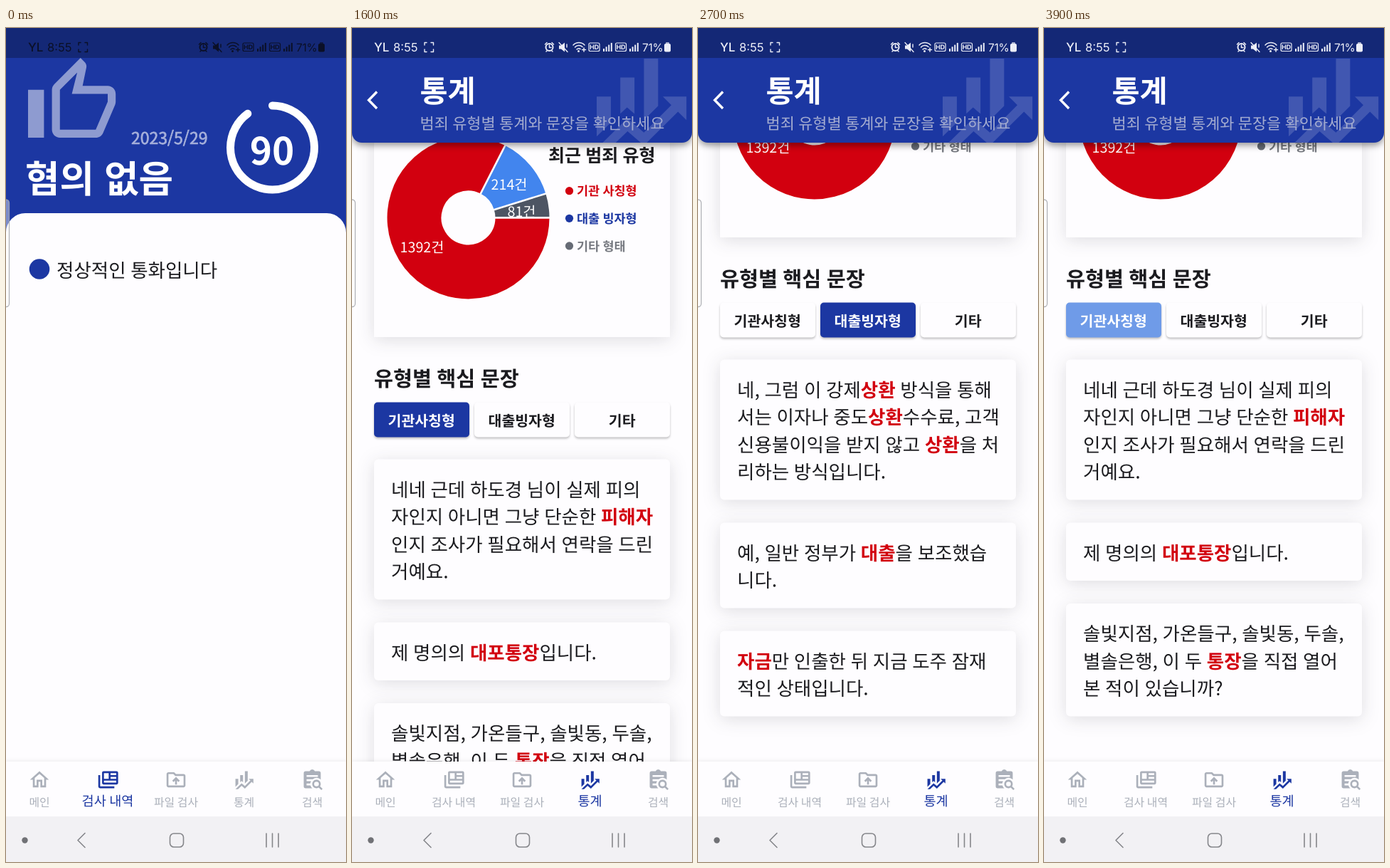
Animation of 478 by 1171 pixels, one loop 4000 ms. Source, as an HTML page:

```html
<!DOCTYPE html>
<html lang="ko">
<head>
<meta charset="utf-8">
<title>통계</title>
<style>
html, body { margin: 0; width: 100%; height: 100%; overflow: hidden; background: #fefdff; }
svg { display: block; width: 478px; height: 1171px; word-spacing: -.045em; text-rendering: geometricPrecision; font-family: "Noto Sans CJK KR", "Noto Sans CJK JP", "Noto Sans CJK", sans-serif; }
.status text { font-family: Inter, Roboto, sans-serif; }
.card { fill: #fefdff; filter: drop-shadow(0 4px 12px rgba(30, 30, 45, .14)); }
.chip { filter: drop-shadow(0 2px 1.5px rgba(0, 0, 0, .25)); }
.head { filter: drop-shadow(0 4px 5px rgba(0, 0, 0, .4)); }
.nav { filter: drop-shadow(0 -2px 2px rgba(0, 0, 0, .05)); }
.line { fill: none; stroke: currentColor; stroke-linecap: round; stroke-linejoin: round; }
</style>
</head>
<body>
<svg id="stage" viewBox="0 0 478 1171" xmlns="http://www.w3.org/2000/svg"></svg>
<script>
const BLUE = '#1c37a2', RED = '#d2000f', PAPER = '#fefdff', INK = '#1b1b1f';
const LOOP = 4000, STEP = 100, MAX_SCROLL = 235.5;

const FINANCE = 'M6 16.5L3 19.44V11H6M11 14.66L9.43 13.32L8 14.64V7H11M16 13L13 16V3H16M18.81 12.81L17 11H22V16L20.21 14.21L13 21.36L9.53 18.34L5.75 22H3L9.47 15.66L13 18.64';
const THUMB = 'M9 21h9c.83 0 1.54-.5 1.84-1.22l3.02-7.05c.09-.23.14-.47.14-.73v-2c0-1.1-.9-2-2-2h-6.31l.95-4.57.03-.32c0-.41-.17-.79-.44-1.06L14.17 1 7.58 7.59C7.22 7.95 7 8.45 7 9v10c0 1.1.9 2 2 2zM9 9l4.34-4.34L12 10h9v2l-3 7H9V9zM1 9h4v12H1z';

const NAV = [
  ['메인', 47, 'M12 5.69l5 4.5V18h-2v-6H9v6H7v-7.81l5-4.5M12 3L2 12h3v8h6v-6h2v6h6v-8h3L12 3z'],
  ['검사 내역', 143, 'M4 7V19H19V21H4C2 21 2 19 2 19V7H4M21.3 3H7.7C6.76 3 6 3.7 6 4.55V15.45C6 16.31 6.76 17 7.7 17H21.3C22.24 17 23 16.31 23 15.45V4.55C23 3.7 22.24 3 21.3 3M8 5H13V11H8V5M21 15H8V13H21V15M21 11H15V9H21V11M21 7H15V5H21V7Z'],
  ['파일 검사', 239, 'M20 6h-8l-2-2H4c-1.1 0-2 .9-2 2v12c0 1.1.9 2 2 2h16c1.1 0 2-.9 2-2V8c0-1.1-.9-2-2-2zm0 12H4V6h5.17l2 2H20v10zM9.41 14.42L11 12.84V17h2v-4.16l1.59 1.59L16 13.01 12.01 9 8 13.01z'],
  ['통계', 334.5, FINANCE],
  ['검색', 430.5, 'M19 3h-4.2a3 3 0 0 0-5.6 0H5a2 2 0 0 0-2 2v14a2 2 0 0 0 2 2h7.1a6 6 0 0 1-2-3H6v-2h3.9a6 6 0 0 1 .9-2.6H6v-2h6.6A6 6 0 0 1 21 11.8V5a2 2 0 0 0-2-2zM6 7h12v2H6zM20.3 18.9a4.5 4.5 0 1 0-1.4 1.4l2.7 2.7 1.4-1.4zM16.5 19a2.5 2.5 0 1 1 0-5a2.5 2.5 0 0 1 0 5z']
];

const CHIPS = [['기관사칭형', 31], ['대출빙자형', 172], ['기타', 313]];
const TAPS = [[0, 0], [2500, 1], [3150, 2], [3800, 0]];
const SENTENCES = [
  [['네네 근데 하도경 님이 실제 피의', '자인지 아니면 그냥 단순한 *피해자*', '인지 조사가 필요해서 연락을 드린', '거예요.'],
   ['제 명의의 *대포통장*입니다.'],
   ['솔빛지점, 가온들구, 솔빛동, 두솔,', '별솔은행, 이 두 *통장*을 직접 열어', '본 적이 있습니까?']],
  [['네, 그럼 이 강제*상환* 방식을 통해', '서는 이자나 중도*상환*수수료, 고객', '신용불이익을 받지 않고 *상환*을 처', '리하는 방식입니다.'],
   ['예, 일반 정부가 *대출*을 보조했습', '니다.'],
   ['*자금*만 인출한 뒤 지금 도주 잠재', '적인 상태입니다.']],
  [['지정한 *계좌* 외 다른 *계좌* 사례가', '확인될 경우 즉시 동결 및 국고 환', '급 조치됩니다.'],
   ['아시다시피 요즘 젊고 어린 장기', '중 신장과 각막을 3개 적출해도 우', '리가 받은 *원금*은 5000만원입니', '다.'],
   ['조사 결과, 가람도 여울시 솔마동', '지점이 2016년 4월 22일에 귀하', '의 *명의*로 오픈한 것으로 확인되었', '습니다.']]
];

// cy is the visual middle of the glyphs
const text = (x, cy, size, fill, str, attrs = '') =>
  `<text x="${x}" y="${cy + size * .375}" font-size="${size}" fill="${fill}" ${attrs}>${
    str.replace(/\*(.+?)\*/g, `<tspan fill="${RED}" font-weight="700">$1</tspan>`)}</text>`;
const BOLD = 'font-weight="700" ', MID = 'text-anchor="middle" ';
const rect = (x, y, w, h, attrs = '') => `<rect x="${x}" y="${y}" width="${w}" height="${h}" ${attrs}/>`;
const line = (d, width, attrs = '') => `<path class="line" d="${d}" stroke-width="${width}" ${attrs}/>`;
const polar = (cx, cy, r, deg) => {
  const a = deg * Math.PI / 180;
  return `${(cx + r * Math.cos(a)).toFixed(2)} ${(cy + r * Math.sin(a)).toFixed(2)}`;
};
const arc = (cx, cy, r, from, to) =>
  `M${polar(cx, cy, r, from)}A${r} ${r} 0 ${to - from > 180 ? 1 : 0} 1 ${polar(cx, cy, r, to)}`;

function resultPage() {
  return rect(0, 0, 478, 1030, `fill="${BLUE}"`) +
    `<path d="${THUMB}" transform="translate(25.4 36.4) scale(5.6)" fill="#fff" opacity=".5"/>` +
    text(176, 154.5, 23, '#a7b1db', '2023/5/29', 'stroke="#a7b1db" stroke-width=".7"') +
    text(27, 211, 52.7, '#fff', '혐의 없음', BOLD) +
    line(arc(374.5, 168, 59, -90, 234), 11, 'style="color:#fff"') +
    text(374, 172.5, 53, '#fff', '90', BOLD + MID) +
    `<path d="M0 1030V287a27 27 0 0 1 27-27H451a27 27 0 0 1 27 27V1030z" fill="${PAPER}"/>` +
    `<circle cx="47" cy="338.5" r="14.3" fill="${BLUE}"/>` +
    text(71, 340, 26.5, INK, '정상적인 통화입니다');
}

function pie(cx, cy) {
  const parts = [[1392, RED, -65, 41], [214, '#4285ee', 57.5, -47], [81, '#4d5563', 75, -9]];
  const total = parts.reduce((sum, p) => sum + p[0], 0);
  let from = 0, slices = '', spokes = '', labels = '';
  for (const [n, color, dx, dy] of parts) {
    const to = from + n / total * 360;
    slices += `<path d="${arc(cx, cy, 76, from, to)}" fill="none" stroke="${color}" stroke-width="76"/>`;
    spokes += `<path d="M${polar(cx, cy, 36, to)}L${polar(cx, cy, 116, to)}" stroke="${PAPER}" stroke-width="2.6"/>`;
    labels += text(cx + dx, cy + dy, 19.7, '#fff', n + '건', MID);
    from = to;
  }
  return slices + spokes + labels;
}

function statsBody() {
  const legend = [['기관 사칭형', RED, RED], ['대출 빙자형', BLUE, BLUE], ['기타 형태', '#666b75', '#777a81']];
  return rect(31, -31.5, 416, 325.5, 'class="card"') + pie(163.5, 126.5) +
    text(276, 38.5, 25, INK, '최근 범죄 유형', BOLD) +
    legend.map(([s, dot, ink], i) => `<circle cx="305.5" cy="${88.8 + i * 38.6}" r="5.6" fill="${dot}"/>` +
      text(316, 89 + i * 38.6, 17.5, ink, s, BOLD)).join('') +
    '<path id="spin" fill="none" stroke="#4285ee" stroke-width="5.4"/>' +
    `<g id="list">${text(31, 352, 29.3, INK, '유형별 핵심 문장', BOLD)}${
      CHIPS.map(([s, x], i) => rect(x, 385.5, 134, 49, `id="chip${i}" class="chip" rx="5"`) +
        text(x + 66.7, 411, 20.5, INK, s, `id="chipText${i}" ${BOLD} ${MID}`)).join('')}${
      SENTENCES.map((set, i) => `<g id="set${i}">${cards(set)}</g>`).join('')}</g>`;
}

function cards(set) {
  let y = 465.5, out = '';
  for (const rows of set) {
    const h = rows.length * 38.5 + 43;
    out += rect(31, y, 416, h, 'class="card" rx="6"');
    rows.forEach((s, i) => out += text(55, y + 42.5 + i * 38.5, 26.5, INK, s));
    y += h + 32;
  }
  return out;
}

function statsHeader() {
  const shape = 'M0 0H478V147a14 14 0 0 1-14 14H14a14 14 0 0 1-14-14z';
  return `<clipPath id="headClip"><path d="${shape}"/></clipPath><path class="head" d="${shape}" fill="${BLUE}"/>` +
    `<g clip-path="url(#headClip)"><path d="${FINANCE}" transform="translate(324.1 23.1) scale(6.64)" fill="#fff" opacity=".16"/></g>` +
    '<path d="M35 89.5L23.5 101.3L35 113" fill="none" stroke="#fff" stroke-width="3.4"/>' +
    text(95.5, 88, 42.5, '#fff', '통계', BOLD) +
    text(95.5, 134, 21.9, '#a4acd0', '범죄 유형별 통계와 문장을 확인하세요');
}

function statusBar() {
  const hd = x => rect(x, 21, 15, 11.5, 'rx="2" class="line" stroke-width="1.2"') +
    `<text x="${x + 7.5}" y="30.4" font-size="9" ${BOLD} ${MID}>HD</text>`;
  const bars = x => [0, 1, 2, 3].map(i => rect(x + i * 3.6, 29 - i * 2.7, 2, 4 + i * 2.7)).join('');
  return rect(0, 0, 478, 42, 'opacity=".27"') +
    `<g id="status" class="status" fill="currentColor">
    <text x="31" y="33" font-size="17" font-weight="500">YL</text><text x="58" y="33" font-size="16.5">8:55</text>` +
    line('M102 24V20.5H105M111 20.5H114.5V24M114.5 30V33.5H111M105 33.5H102V30', 1.4) +
    `<g id="shot">${rect(105.5, 24.5, 5.5, 5, 'rx="1" class="line" stroke-width="1.3"')}</g>` +
    '<circle class="line" cx="277.5" cy="27" r="5" stroke-width="2"/>' +
    line('M277.5 24V27.5H280M271.5 23L274 20.5M281 20.5L283.5 23M273 33L274 32M282 33L281 32', 1.5) +
    '<path d="M291 24.5H294L299 20.5V33.5L294 29.5H291z"/>' + line('M291 20.5L303 33.5M302 23V27', 1.4) +
    line('M311 24A11 11 0 0 1 327 24M313.5 27A7.5 7.5 0 0 1 324 26.5M316 30A4 4 0 0 1 321 29.5M326 28V33M323.5 30.5H328.5', 1.5) +
    '<circle cx="318.5" cy="32.5" r="1.5"/>' + hd(333) + bars(353) + hd(370.5) + bars(390) +
    '<text x="408" y="32.5" font-size="15.5" letter-spacing="-.3">71%</text>' +
    rect(439, 22, 9, 11.5, 'rx="2"') + rect(441, 20, 5, 3, 'rx="1" opacity=".7"') + '</g>';
}

function bottomBars() {
  return rect(0, 1030, 478, 78, `class="nav" fill="${PAPER}"`) +
    NAV.map(([s, x, d], i) => `<g id="nav${i}"><path d="${d}" fill-rule="${i === 1 ? 'evenodd' : 'nonzero'}" transform="translate(${x - 15.9} 1039.6) scale(1.327)"/>` +
      `<text id="label${i}" x="${x}" ${MID}>${s}</text></g>`).join('') +
    rect(0, 1107, 478, 64, 'fill="#f2f1f4"') +
    '<g style="color:#85868a"><circle cx="26.5" cy="1140.5" r="4.2" fill="#707175"/>' +
    line('M111 1130.5L101 1140.5L111 1150.5', 1.6) + rect(230.5, 1131, 19, 19, 'rx="5.5" class="line" stroke-width="1.6"') +
    line('M366 1131V1150M374.5 1131V1150M383 1131V1150', 1.6) + '</g>';
}

document.getElementById('stage').innerHTML =
  `<clipPath id="body">${rect(0, 0, 478, 1030)}</clipPath>` +
  `<g id="result">${resultPage()}</g>` +
  `<g clip-path="url(#body)"><g id="stats">${rect(0, 0, 478, 1030, `fill="${PAPER}"`)}<g id="scroll">${statsBody()}</g>${statsHeader()}</g></g>` +
  rect(-6, 241, 10.5, 150.5, 'rx="4.5" fill="#fff" fill-opacity=".42" stroke="#a3a5ab" stroke-opacity=".85" stroke-width="1.3"') +
  bottomBars() + statusBar();

const el = {};
document.querySelectorAll('[id]').forEach(n => el[n.id] = n);
const set = (id, name, value) => el[id].setAttribute(name, value);
const show = (id, on) => set(id, 'display', on ? 'inline' : 'none');
const clamp = v => Math.min(1, Math.max(0, v));
const span = (t, from, ms) => clamp((t - from) / ms);
const lerp = (a, b, k) => a + (b - a) * k;
const mix = (a, b, k) => `rgb(${a.map((v, i) => Math.round(lerp(v, b[i], k)))})`;

// cubic-bezier with control points (x1,y1) and (x2,y2)
function bezier(x1, y1, x2, y2, x) {
  const at = (a, b, s) => 3 * (1 - s) * (1 - s) * s * a + 3 * (1 - s) * s * s * b + s * s * s;
  let lo = 0, hi = 1;
  for (let i = 0; i < 24; i++) {
    const s = (lo + hi) / 2;
    if (at(x1, x2, s) < x) lo = s; else hi = s;
  }
  return at(y1, y2, (lo + hi) / 2);
}

function render(t) {
  // page fades in while rising
  const p = span(t, 700, 300);
  const rise = 300 * (1 - bezier(.4, 0, .2, 1, p));
  show('result', p < 1);
  show('stats', p > 0);
  set('stats', 'opacity', bezier(.42, 0, 1, 1, p));
  set('stats', 'transform', `translate(0 ${rise.toFixed(2)})`);

  const s = .5 - .5 * Math.cos(Math.PI * span(t, 1290, 705));
  set('scroll', 'transform', `translate(0 ${(MAX_SCROLL * (1 - s)).toFixed(2)})`);

  const loaded = t >= 1200;
  show('list', loaded);
  show('spin', !loaded);
  const turn = -70 + (t - 900) * .3;
  set('spin', 'd', arc(239, 350.5, 21.5, turn, turn + Math.max(8, 36 + (t - 900) * .4)));

  const [since, tab] = TAPS.filter(tap => tap[0] <= t).pop();
  CHIPS.forEach((_, i) => {
    const on = i === tab;
    const tint = mix([111, 155, 232], [28, 55, 162], since ? span(t, since + 100, 100) : 1);
    set('chip' + i, 'fill', on ? tint : PAPER);
    set('chipText' + i, 'fill', on ? '#fff' : INK);
    show('set' + i, on);
  });

  const moved = span(t, 600, 200);
  NAV.forEach((_, i) => {
    const k = i === 1 ? 1 - moved : i === 3 ? moved : 0;
    const size = lerp(15.9, 18.6, k);
    set('nav' + i, 'fill', mix([171, 176, 186], [28, 55, 162], k));
    set('label' + i, 'font-size', size);
    set('label' + i, 'y', lerp(1087, 1085.5, k) + size * .375);
  });

  el.status.style.color = t < 1000 ? '#0b1027' : '#eceef7';
  show('shot', t >= 3400 && t < 3700);
}

const start = performance.now();
function tick() {
  const t = (performance.now() - start) % LOOP;
  render(Math.floor(t / STEP) * STEP);
  requestAnimationFrame(tick);
}
tick();
</script>
</body>
</html>
```
